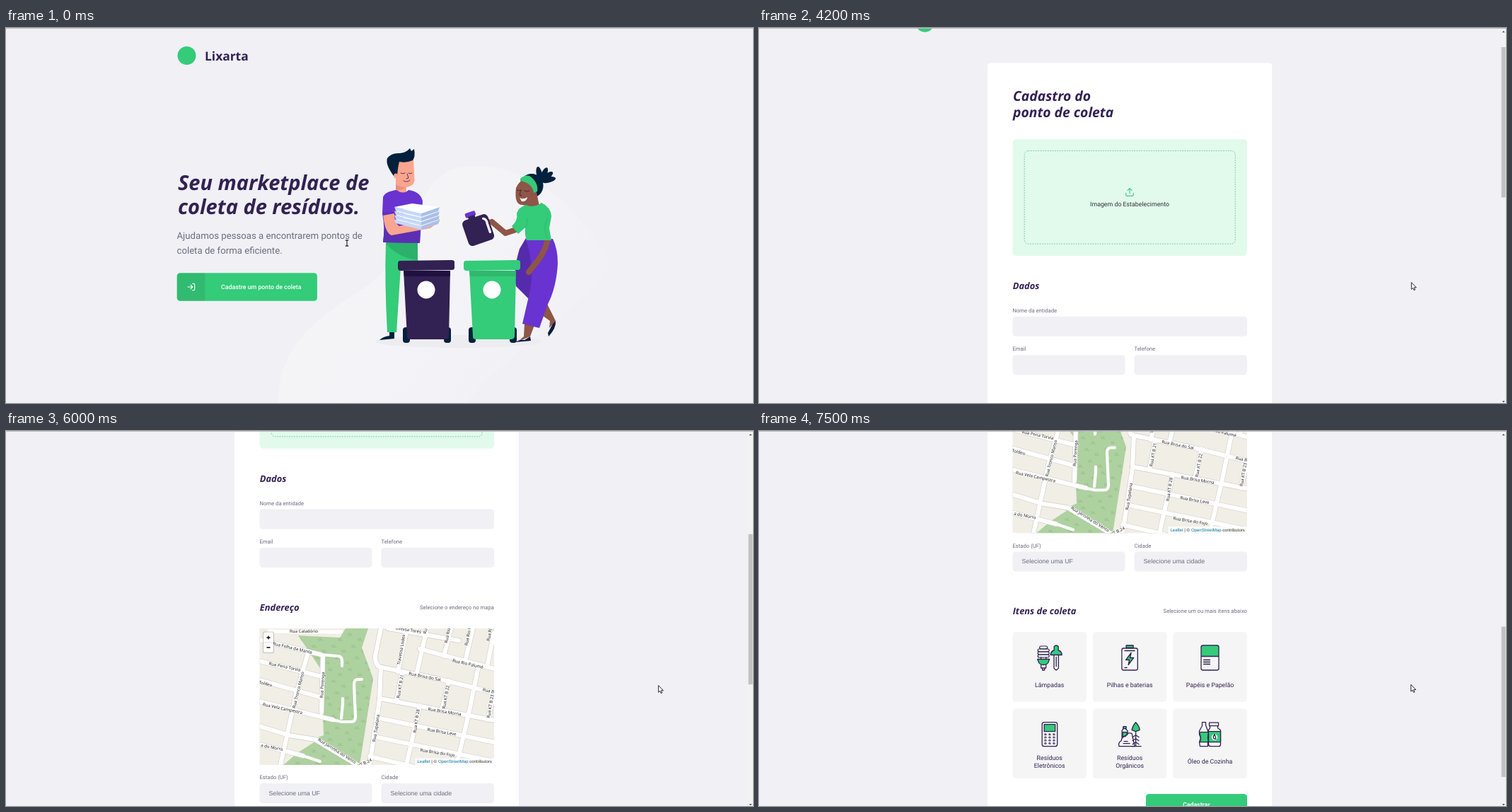
An HTML page with a canvas for the animation above (8000 ms loop, 1056 by 530 pixels).

```html
<!DOCTYPE html>
<html lang="pt-BR">
<head>
<meta charset="utf-8">
<title>Lixarta</title>
<style>
html, body { margin: 0; width: 100%; height: 100%; overflow: hidden; background: #f0f0f5; }
canvas { display: block; }
</style>
</head>
<body>
<canvas id="stage" width="1056" height="530"></canvas>
<script>
const W = 1056, H = 530, LOOP = 8000;
const ctx = document.getElementById('stage').getContext('2d');
const GREEN = '#34cb79', DEEP = '#2fb86e', PLUM = '#322153', GREY = '#6c6c80',
      PAGE = '#f0f0f5', VIOLET = '#6833d0', NAVY = '#03203c', SKIN = '#faa58f', BROWN = '#8f5546';
const BRAND = 'Lixarta';
const roboto = (size, weight = 400) => `${weight} ${size}px Roboto, sans-serif`;
const title = size => `italic 700 ${size}px "Open Sans", sans-serif`;
const clamp = v => Math.max(0, Math.min(1, v));
const mix = (a, b, k) => a + (b - a) * k;

function fill(color, d) {
  ctx.fillStyle = color;
  ctx.fill(new Path2D(d));
}
function line(color, width, d) {
  ctx.strokeStyle = color;
  ctx.lineWidth = width;
  ctx.stroke(new Path2D(d));
}
function box(color, x, y, w, h, r = 0) {
  ctx.fillStyle = color;
  ctx.beginPath();
  ctx.roundRect(x, y, w, h, r);
  ctx.fill();
}
function frame(color, width, x, y, w, h, r = 0) {
  ctx.strokeStyle = color;
  ctx.lineWidth = width;
  ctx.beginPath();
  ctx.roundRect(x, y, w, h, r);
  ctx.stroke();
}
function dot(color, x, y, rx, ry = rx) {
  ctx.fillStyle = color;
  ctx.beginPath();
  ctx.ellipse(x, y, rx, ry, 0, 0, 7);
  ctx.fill();
}
// y is the middle of the capital letters
function text(str, x, y, font, color, align = 'left') {
  ctx.font = font;
  ctx.fillStyle = color;
  ctx.textAlign = align;
  ctx.fillText(str, x, y + parseFloat(font.match(/([\d.]+)px/)[1]) * 0.355);
}
function at(x, y, angle, draw) {
  ctx.save();
  ctx.translate(x, y);
  ctx.rotate(angle);
  draw();
  ctx.restore();
}

function header(x) {
  dot(GREEN, x + 13.5, 39, 13);
  text(BRAND, x + 39, 39.5, '700 17.4px "Open Sans", sans-serif', PLUM);
}

// ---------- home ----------
function bin(x, main, shade) {
  box(NAVY, x + 7, 423, 10, 22, 4);
  box(NAVY, x + 65, 423, 10, 22, 4);
  fill(main, `M${x + 8} 343H${x + 74}L${x + 72} 436Q${x + 71} 440 ${x + 67} 440H${x + 17}Q${x + 13} 440 ${x + 13} 436Z`);
  fill(shade, `M${x + 8} 343H${x + 74}V351H${x + 9}Z`);
  fill(main, `M${x + 3} 329L${x + 76} 328Q${x + 80} 328 ${x + 80} 331V339Q${x + 80} 342 ${x + 76} 342L${x + 4} 343Q${x} 343 ${x} 339V333Q${x} 329 ${x + 3} 329Z`);
  dot('#fff', x + 40, 370, 12.5);
}

function man() {
  fill(GREEN, 'M537 302L582 303V330L558 338 552 430H539Q535 360 537 302Z');
  fill('#2bb169', 'M538 303H582V328Q558 326 538 306Z');
  fill(NAVY, 'M542 430H549V439L528 441Q533 436 542 435Z');
  fill(SKIN, 'M550 190L576 186 577.5 216Q576 224 566 225V232Q558 236 551 231V210Z');
  fill('#e8927d', 'M551 221Q557 225 566 225 560 230 551 229Z');
  fill(NAVY, 'M548 209Q536 193 539 184 545 176 557 177 566 176 571 170L573 174 577 171Q579 182 575 187 566 191 556 189 554 196 553 209Z');
  dot(SKIN, 551, 209, 2.8, 3.6);
  line('#4b2a3c', 0.9, 'M558 205q3 2 6 0M569 205q3 2 5 0M562 216q5 3 9-1M567 206l2 6-3 1');
  fill(VIOLET, 'M533 239Q536 231 552 229 562 236 569 229 586 231 589 245L585 304 533 303Q536 284 532 262Z');
  fill('#5a2fb3', 'M535 282L550 288 586 282 585 304 533 303Z');
  fill(SKIN, 'M533 262L549 258Q548 275 556 280L606 268Q614 268 613 273L600 283 545 293Q535 289 533 262Z');
  fill('#5f2fc0', 'M532 261L550 258 549 262 533 265Z');
  for (let i = 0; i < 4; i++) {
    const y = 271 - i * 6;
    fill('#c5d8fa', `M549 ${y}l38 9v5l-36-9z`);
    fill('#a9c0e8', `M587 ${y + 9}l26-9-2 6-24 8z`);
    fill('#fff', `M549 ${y}l25-5 39 5-26 9z`);
  }
}

function can() {
  at(666, 284, -0.33, () => {
    box(VIOLET, -10, -26, 15, 7, 2);
    box(PLUM, -7, -20, 10, 6);
    box(PLUM, -18, -17, 38, 38, 6);
    line('#f4f4f8', 3.5, 'M13-11Q17-9 16-3V10');
  });
}

function woman() {
  for (const angle of [-0.2, 0.42, 0.9, 1.35])
    at(756, 217, angle, () => dot(NAVY, 0, -11, 4, 10.5));
  dot(NAVY, 743, 223, 16.5, 17);
  fill(BROWN, 'M721 226Q727 212 740 216L750 230 746 246Q742 252 730 250 718 250 721 226Z');
  fill(BROWN, 'M737 236L750 232 754 252H733Z');
  fill(GREEN, 'M727 213Q733 207 740 209 753 218 751 231L746 233Q744 219 727 216Z');
  line('#41232a', 0.9, 'M722 229q3 2 6 0M733 230q4 2 7 0M728 229l-2 7 3 1');
  fill('#fff', 'M726 240Q732 243 737 239 736 246 729 245Z');
  fill(BROWN, 'M752 402L764 388 777 414 768 424 769 414ZM733 418L747 420 741 436 724 443 732 436Z');
  fill(NAVY, 'M777 414Q778 424 767 436L766 431 773 418ZM720 444Q726 440 733 441L741 436 742 442Z');
  fill('#552bac', 'M735 297L726 312Q716 345 721 365L745 389 762 325Z');
  fill(VIOLET, 'M735 298H773Q780 312 780 333 778 367 766 390L754 424 730 418 740 375Q748 340 735 298Z');
  line(BROWN, 8, 'M724 284L706 290 687 274');
  line(BROWN, 5, 'M688 275L681 272');
  line(BROWN, 8, 'M766 296Q764 315 746 336L739 345');
  fill(GREEN, 'M735 250Q746 255 757 247 770 253 771 266L768 283 771 300H736Q733 292 734 282L724 291 715 280Q724 272 722 262 725 253 735 250Z');
  line(DEEP, 1, 'M766 268Q758 282 765 298M734 282Q738 275 736 268');
}

function home(hover) {
  const glow = ctx.createLinearGradient(470, 280, 800, 520);
  glow.addColorStop(0, '#f5f5f8');
  glow.addColorStop(0.6, '#f3f3f7');
  glow.addColorStop(1, '#f0f0f5');
  fill(glow, 'M385 530C385 440 450 405 510 365 585 310 570 215 640 197 700 186 760 215 800 258 830 292 855 325 853 336 845 370 730 440 650 530Z');
  header(242);
  text('Seu marketplace de', 243, 219, title(29), PLUM);
  text('coleta de resíduos.', 243, 252.7, title(29), PLUM);
  text('Ajudamos pessoas a encontrarem pontos de', 241.5, 293, roboto(13.2), GREY);
  text('coleta de forma eficiente.', 241.5, 314, roboto(13.2), GREY);
  box(`rgb(${mix(52, 47, hover)},${mix(203, 184, hover)},${mix(121, 110, hover)})`, 241.7, 346.2, 198.2, 39.6, 4.5);
  box('rgba(0,0,0,.08)', 241.7, 346.2, 39.6, 39.6, [4.5, 0, 0, 4.5]);
  line('#fff', 1.1, 'M257 366H263.5M261 363.2L263.8 366 261 368.8M263.5 361.3H265.3Q266.7 361.3 266.7 362.7V369.3Q266.7 370.7 265.3 370.7H263.5');
  text('Cadastre um ponto de coleta', 360.7, 366, roboto(8.8, 500), '#fff', 'center');
  dot('#ececf1', 640, 443, 118, 9);
  man();
  bin(554, PLUM, '#20103e');
  woman();
  can();
  bin(647, GREEN, DEEP);
}

// ---------- map, drawn in its own view ----------
const PARK = 'M413 289L472 292 480 279H512L503 306 519 350 500 472 441 433 449 430 446 338ZM392 472L412 455 440 437 497 472Z';
const STREETS = [
  'M358 295L445 316M358 325L446 347M358 352L444 376',
  'M358 382L445 404 462 408M358 417L400 430 437 436 500 474',
  'M358 443L405 455 420 459M427 313L410 372 388 472M448 318L446 398',
  'M530 279L522 318Q522 332 530 334L528 380 514 472M526 333L610 350 690 370M585 308L690 336M540 279L640 296',
  'M528 378L690 409M524 405L690 440M521 432L690 467M514 460L575 474',
  'M567 279L554 340M595 279L580 345M629 279L619 318M660 279L649 326M690 285L680 333',
  'M560 341L552 382M626 353L616 395M668 332L654 400 637 472M585 388L566 472M690 372L681 408'
];
const TRAILS = 'M445 316L468 318Q475 318 475 325V332M476 378V386L474 406M460 408L475 411H488Q494 411 494 404L492 358Q492 351 498 351H503M420 459L444 467';
const NAMES = [
  ['Rua Caladório', 421, 282.5, 0], ['Rua Folha da Manta', 405, 306.5, 0.23], ['Rua Pena Torvia', 394, 333, 0.21],
  ['Toldeu', 367, 357, 0.22], ['Rua Tronco Manso', 413, 366, -1.33], ['Rua Porenga', 447, 359, -1.5],
  ['Rua Vela Campestra', 391, 392, 0.21], ['Rua Jarrinha do Vento', 468, 452, 0.56], ['a do Morro', 376, 447, 0.2],
  ['Rua Tupelana', 523, 420, -1.42], ['Travessa Lodes', 558.5, 309, -1.4], ['avessa Torés', 569, 281, 0.16],
  ['Rua', 593, 281, -1.3], ['Rua Rio', 624, 289, -1.38], ['Rua Rio V', 653, 290, -1.38], ['Rua Ri', 683, 288, -1.38],
  ['Rua Rio Palumé', 653, 329, 0.22], ['Rua Brisa do Sal', 592, 347, 0.2], ['Rua Brisa Morna', 620, 396.5, 0.16],
  ['Rua Brisa Leve', 616, 425, 0.17], ['Rua Brisa do Fojo', 610, 454.5, 0.16], ['Rua B', 682, 367, 0.2],
  ['Rua KT B 21', 557, 361, -1.4], ['Rua KT B 22', 621.5, 376, -1.4], ['Rua KT B 28', 580, 410, -1.42],
  ['Rua KT B 23', 684.5, 389, -1.4], ['KT B 24', 507, 469, -0.45]
];

function map() {
  ctx.save();
  ctx.beginPath();
  ctx.rect(358.5, 279, 331.5, 193);
  ctx.clip();
  box('#f1eee6', 358, 279, 332, 193);
  fill('#aed1a0', PARK);
  ctx.save();
  ctx.clip(new Path2D(PARK));
  for (let row = 0; row < 12; row++)
    for (let col = 0; col < 9; col++)
      line('#9abf8d', 0.9, `M${400 + col * 14 + row % 3 * 5} ${286 + row * 16.5 + col % 2 * 7}v3h2v-3m1.5 0v3h2`);
  ctx.restore();
  for (const d of STREETS) line('#cfccc6', 7.4, d);
  for (const d of STREETS) line('#fff', 6.2, d);
  line('#fff', 5, 'M372 283L474 284');
  line('#fff', 4.2, TRAILS);
  ctx.font = '6.1px "Noto Sans", sans-serif';
  ctx.textAlign = 'center';
  for (const [name, x, y, angle] of NAMES) at(x, y, angle, () => {
    ctx.strokeStyle = 'rgba(255,255,255,.85)';
    ctx.lineWidth = 1.6;
    ctx.strokeText(name, 0, 2.2);
    ctx.fillStyle = '#222';
    ctx.fillText(name, 0, 2.2);
  });
  box('rgba(255,255,255,.75)', 578.5, 462.5, 112, 9.5);
  const small = '6.05px "Liberation Sans", sans-serif';
  text('contributors', 686.8, 467.2, small, '#333', 'right');
  text('OpenStreetMap', 653.6, 467.2, small, '#0078a8', 'right');
  text('| ©', 609, 467.2, small, '#333', 'right');
  text('Leaflet', 581.5, 467.2, small, '#0078a8');
  box('rgba(0,0,0,.2)', 363, 283.5, 16, 30.5, 2.5);
  box('#fff', 364, 284.5, 14, 28.5, 2);
  line('#ccc', 0.6, 'M364 298.8H378');
  ctx.lineCap = 'butt';
  line('#000', 1.3, 'M368.5 292H373.5M371 289.5V294.5M368.5 306H373.5');
  ctx.lineCap = 'round';
  ctx.restore();
}

// ---------- item icons, centred on the origin ----------
const outline = d => line(PLUM, 1.3, d);
const solid = d => { fill(GREEN, d); outline(d); };
const ICONS = {
  lamp() {
    frame(PLUM, 1.2, -14, -16.5, 11, 4, 2);
    for (const y of [-12.5, -8.5, -4.5]) frame(PLUM, 1.2, -16.5, y, 16, 4, 2);
    outline('M-12-0.5V2M-5-0.5V2');
    solid('M-17 2H0L-2 7Q-4 10-8.5 10T-15 7Z');
    outline('M-12 10V14.5H-5V10M-10 14.5V17.5H-7V14.5');
    solid('M6.5-10.5V-16Q9.5-19 12.5-16V-10.5Q17-9.5 17.5-4H1.5Q2-9.5 6.5-10.5Z');
    outline('M6.3-4V14.5Q9.5 20 12.7 14.5V-4M9.5-1V12');
  },
  battery() {
    solid('M-5-14V-17.5H5V-14Z');
    frame(PLUM, 1.3, -11.2, -13.5, 22.4, 31, 2.5);
    solid('M2-7L-5.5 3H-0.5L-2 10 5.5 0H0.5Z');
    outline('M-7-10H7M-7 14H-4');
  },
  paper() {
    box(GREEN, -12.5, -17, 25, 15);
    frame(PLUM, 1.3, -12.5, -17.5, 25, 35, 2.5);
    outline('M-9 3H0M-9 6H0M-9 9H0M-12-2H12');
  },
  phone() {
    frame(PLUM, 1.3, -10.5, -17, 21.5, 34, 3);
    solid('M-7.5-14H8V-4H-7.5Z');
    for (let i = 0; i < 12; i++) frame(PLUM, 1, -7 + i % 3 * 6, -0.5 + (i / 3 | 0) * 4.2, 2.6, 1.6, 0.6);
  },
  organic() {
    outline('M-15 17Q-17 12-12 9-11 3-6 3-3-4 3-1L5 8 7 17ZM-11 6V-5L-9-8V-11H-6V-8L-3-5V0');
    solid('M-9-8V-11H-5V-8ZM-10-3H-4V1L-10 4Z');
    solid('M8.5-17Q14-11 14-6L8.5-4 3-6Q4-12 8.5-17Z');
    outline('M8.5-4V17M4 4L8.5 1 13 4M4 9L8.5 6 13 9M4 14L8.5 11 13 14M3 17H16M-8 10H-3M-9 13H0');
  },
  oil() {
    outline('M-11-17H-6V-13L-3-5V0L-4 5-3 11V17H-14L-15 11-13 5-15 0V-5L-11-12Z');
    solid('M-15-3H-2L-3 5-2 11H-14L-13 5Z');
    outline('M-1-16.5H12V-12H-1ZM0-12V-9L-2-6V14Q-2 17 1 17H12Q15 17 15 14V-6L11-9V-12');
    solid('M-2-4H15V11H-2Z');
    dot('#fff', 6.5, 4, 4.2);
    outline('M6.5 0Q3 5 6.5 6.5T6.5 0Z');
  }
};
const ITEMS = [
  ['lamp', 'Lâmpadas'], ['battery', 'Pilhas e baterias'], ['paper', 'Papéis e Papelão'],
  ['phone', 'Resíduos', 'Eletrônicos'], ['organic', 'Resíduos', 'Orgânicos'], ['oil', 'Óleo de Cozinha']
];

// ---------- form ----------
function field(label, x, y, w, hint = '') {
  text(label, x, y - 8.7, roboto(7.7), GREY);
  box(PAGE, x, y, w, 28, 4.5);
  text(hint, x + 13, y + 13.8, '8.8px "Liberation Sans", sans-serif', GREY);
}
function section(name, y, note = '') {
  text(name, 358.7, y, title(12.9), PLUM);
  text(note, 690, y, roboto(7.7), GREY, 'right');
}

function form(scroll) {
  ctx.save();
  ctx.translate(0, -scroll);
  header(221);
  line(GREEN, 1, 'M743.5 39.2H748.7M746 36.6L743.4 39.2 746 41.8');
  text('Voltar para home', 759, 39.3, roboto(8.8, 500), PLUM);
  box('#fff', 323, 95.5, 402, 1160, 4.5);
  text('Cadastro do', 359, 142.5, title(19.3), PLUM);
  text('ponto de coleta', 359, 165.7, title(19.3), PLUM);

  box('#e1faec', 358.5, 203.5, 331.5, 164.8, 5.5);
  ctx.setLineDash([1.7, 1.7]);
  ctx.lineCap = 'butt';
  frame('#4ebd8c', 0.8, 375.2, 219.9, 298, 131.5, 5.5);
  ctx.setLineDash([]);
  ctx.lineCap = 'round';
  line('#43c983', 1.1, 'M518.7 279.5V282Q518.7 283.7 520.4 283.7H527.6Q529.3 283.7 529.3 282V279.5M524 280V273M521 276L524 273 527 276');
  text('Imagem do Estabelecimento', 524, 294.7, roboto(8.8), '#333', 'center');

  section('Dados', 411);
  field('Nome da entidade', 358.5, 454, 331.5);
  field('Email', 358.5, 508.5, 159);
  field('Telefone', 530.5, 508.5, 159.5);

  section('Endereço', 592.5, 'Selecione o endereço no mapa');
  at(0, 343.5, 0, map);
  field('Estado (UF)', 358.5, 841.5, 159, 'Selecione uma UF');
  field('Cidade', 530.5, 841.5, 159.5, 'Selecione uma cidade');

  section('Itens de coleta', 925, 'Selecione um ou mais itens abaixo');
  ITEMS.forEach(([icon, ...lines], i) => {
    const x = 358.5 + i % 3 * 113.4, y = 955 + (i / 3 | 0) * 108.2, mid = x + 52.2;
    box('#f5f5f5', x, y, 104.5, 98.8, 4.5);
    at(mid, y + 36.5, 0, ICONS[icon]);
    lines.forEach((word, n) =>
      text(word, mid, y + 75 + (n - (lines.length - 1) / 2) * 10.4, roboto(8.8), PLUM, 'center'));
  });
  box(GREEN, 547, 1184, 143, 31, 4.5);
  text('Cadastrar', 618.3, 1198.8, roboto(8.8, 700), '#fff', 'center');
  ctx.restore();

  box('#f2f2f2', 1048.5, 1, 8, H);
  box('#c1c1c1', 1049.5, 8.5 + scroll * 0.3994, 6, 212.5);
  fill(scroll ? '#505050' : '#a3a3a3', 'M1050.5 6.3H1054.5L1052.5 4Z');
  fill('#505050', 'M1050.5 527H1054.5L1052.5 529.3Z');
}

// ---------- pointer and timing ----------
const POINTERS = {
  beam() {
    const d = 'M-1.8-4H1.8M0-4V4M-1.8 4H1.8';
    line('#fff', 2.4, d);
    line('#333', 1.3, d);
  },
  arrow() {
    const d = 'M0 0V9.3L2.2 7.4 3.7 10.7 5.2 10 3.8 6.8H6.5Z';
    fill('#fff', d);
    line('#111', 0.9, d);
  },
  hand() {
    const d = 'M-1 6V0Q0-1.2 1 0V3.6L6 4.6Q7 5 6.7 7L5.6 11H0L-3.2 7Q-3 4.8-1 6Z';
    fill('#fff', d);
    line('#111', 0.9, d);
  }
};
const REST = [482, 304], ON_BUTTON = [398, 362], ON_FORM = [622, 320];
const glide = (a, b, k) => a.map((v, i) => mix(v, b[i], 1 - (1 - k) ** 2));

function pointer(t) {
  const tick = Math.floor(t / 100);
  if (t >= 6300) return [921.7, 358.8, 'arrow'];
  if (t >= 3700) return [922.3, 360, 'arrow'];
  if (t >= 1900) return [...glide(ON_BUTTON, ON_FORM, clamp((tick - 18) / 7)), 'arrow'];
  const [x, y] = glide(REST, ON_BUTTON, clamp((tick - 1) / 9));
  return [x, y, y < 324 ? 'beam' : y < 346 ? 'arrow' : 'hand'];
}

const SCROLL = [
  [4200, 46.3], [4400, 91], [4700, 116.5], [5000, 175], [5300, 268.6], [5500, 306], [5800, 320.6],
  [6000, 343.5], [6300, 420], [6600, 495.5], [6900, 523.5], [7200, 597], [7500, 671]
];
const scrollAt = t => SCROLL.reduce((s, [from, top]) => t >= from ? top : s, 0);

function statusBubble(t) {
  const tick = Math.floor(t / 100);
  ctx.globalAlpha = clamp((tick - 11) / 2) * clamp((20 - tick) / 2);
  if (ctx.globalAlpha > 0) {
    box('#d5d5da', 0, 520, 97, 10, [0, 2, 0, 0]);
    box('#fff', 0, 520.6, 96.4, 10, [0, 2, 0, 0]);
    text('localhost:3000/create-point', 3.5, 525.5, '6.6px "Noto Sans", sans-serif', '#5f6368');
  }
  ctx.globalAlpha = 1;
}

function render() {
  const t = performance.now() % LOOP;
  ctx.textRendering = 'geometricPrecision';
  ctx.lineCap = ctx.lineJoin = 'round';
  box(PAGE, 0, 0, W, H);
  if (t < 1600) home(clamp((Math.floor(t / 100) - 6) / 2));
  else form(scrollAt(t));
  statusBubble(t);
  box('#bdbdc2', 0, 0, W, 1);
  const [x, y, kind] = pointer(t);
  at(x, y, 0, POINTERS[kind]);
  requestAnimationFrame(render);
}
render();
</script>
</body>
</html>
```
